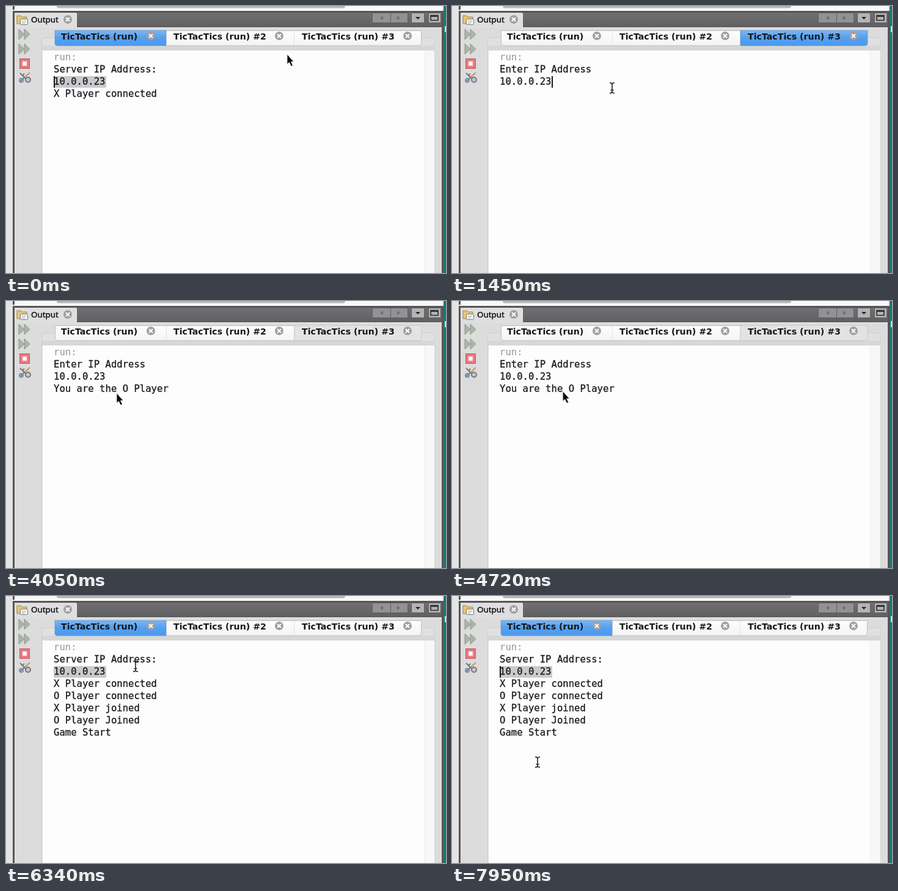
Recreate the animation shown at these times as an HTML page. Size 720 by 438 pixels, loop 7990 ms.

```html
<!DOCTYPE html>
<html lang="en">
<head>
<meta charset="utf-8">
<title>Output console</title>
<style>
  html, body { margin: 0; width: 100%; height: 100%; overflow: hidden; background: #e0e0e0; }
  svg { display: block; width: 720px; height: 438px; }
  text { white-space: pre; }
  .mono { font: 15.6px "DejaVu Sans Mono", monospace; fill: #1a1a1a; }
  .mono text { stroke: #1a1a1a; stroke-width: .3; }
  .muted { fill: #949494; }
  .tab { font: bold 14.2px "DejaVu Sans", sans-serif; fill: #161616; }
  .title { font: 13.4px "Noto Sans", sans-serif; fill: #111; stroke: #111; stroke-width: .4; }

  .timed { animation: 7990ms step-end infinite; }
  .server { animation-name: server; }
  .client { animation-name: client; }
  .focused { animation-name: focused; }
  .unfocused { animation-name: unfocused; }
  .pasted { animation-name: pasted; }
  .assigned { animation-name: assigned; }
  .started { animation-name: started; }
  .server-caret { animation-name: server-caret; }
  .caret-before { animation-name: caret-before; }
  .caret-after { animation-name: caret-after; }
  .arrow { animation-name: arrow; }
  .beam { animation-name: beam; }
  .press { animation-name: press; }
  .pointer { animation: travel 7990ms ease-in-out infinite; }

  @keyframes server { 0%, 70.71%, 100% { opacity: 1 } 7.01% { opacity: 0 } }
  @keyframes client { 0%, 70.71%, 100% { opacity: 0 } 7.01% { opacity: 1 } }
  @keyframes focused { 0%, 25.03%, 100% { opacity: 0 } 7.01% { opacity: 1 } }
  @keyframes unfocused { 0%, 70.71%, 100% { opacity: 0 } 25.03% { opacity: 1 } }
  @keyframes pasted { 0%, 100% { opacity: 0 } 16.27% { opacity: 1 } }
  @keyframes assigned { 0%, 100% { opacity: 0 } 37.55% { opacity: 1 } }
  @keyframes started { 0%, 100% { opacity: 0 } 70.71% { opacity: 1 } }
  @keyframes server-caret {
    0%, 70.71%, 83.23%, 95.74%, 100% { opacity: 1 }
    7.01%, 76.97%, 89.49% { opacity: 0 }
  }
  @keyframes caret-before { 0%, 13.27%, 100% { opacity: 0 } 7.01% { opacity: 1 } }
  @keyframes caret-after { 0%, 22.53%, 100% { opacity: 0 } 16.27% { opacity: 1 } }
  @keyframes arrow { 0%, 25.03%, 100% { opacity: 1 } 10.6%, 74% { opacity: 0 } }
  @keyframes beam { 0%, 25.03%, 100% { opacity: 0 } 10.6%, 74% { opacity: 1 } }
  @keyframes press { 0%, 7.5%, 70.71%, 100% { opacity: 0 } 5.5%, 67.8% { opacity: 1 } }
  @keyframes travel {
    0% { transform: translate(460px, 80px) }
    5%, 8% { transform: translate(560px, 53px) }
    15.5%, 33% { transform: translate(262px, 134px) }
    42%, 58% { transform: translate(181px, 152px) }
    66.5%, 71.5% { transform: translate(187px, 54px) }
    78.5%, 81% { transform: translate(212px, 115px) }
    92%, 100% { transform: translate(140px, 272px) }
  }
</style>
</head>
<body>
<svg viewBox="0 0 720 438">
  <defs>
    <linearGradient id="blue" x2="0" y2="1">
      <stop stop-color="#7db5f3"/><stop offset=".5" stop-color="#559fee"/><stop offset="1" stop-color="#4b9bf0"/>
    </linearGradient>
    <linearGradient id="bar" x2="0" y2="1">
      <stop stop-color="#707072"/><stop offset="1" stop-color="#5f5f61"/>
    </linearGradient>
    <linearGradient id="pale" x2="0" y2="1">
      <stop stop-color="#fdfdfd"/><stop offset="1" stop-color="#f4f4f4"/>
    </linearGradient>
    <g id="close">
      <circle r="7" fill="#a0a0a0"/>
      <path d="M-3-3 3 3M3-3-3 3" stroke="#fff" stroke-width="2"/>
    </g>
    <path id="forward" d="M0 0 9 8.5 0 17zM9 0 18 8.5 9 17z" fill="#acb5aa" stroke="#8b9688"/>
  </defs>

  <!-- window frame -->
  <rect width="720" height="438" fill="#e4e4e4"/>
  <rect x="14" width="700" height="8" fill="#f8f8f8"/>
  <rect x="83" y="-4" width="472" height="7.5" rx="3.5" fill="#b6b6b8"/>
  <path d="M12.5 0V6" stroke="#555" stroke-width="3"/>
  <rect x="11" y="8" width="705" height="430" fill="#555557"/>
  <rect x="14" y="11" width="699" height="427" fill="#dcdcdc"/>
  <rect x="716" width="4" height="438" fill="#1b7874"/>
  <rect x="718" y="33" width="2" height="10" fill="#d5e3e1"/>

  <!-- title bar -->
  <rect x="115" y="11" width="598" height="24" fill="url(#bar)"/>
  <rect x="14" y="12" width="101" height="24" fill="#dfdfe1"/>
  <path d="M115.5 12V35.5H713" fill="none" stroke="#f0f0f0"/>
  <path d="M18 16h6l2 2h8v11H18z" fill="#e8c56c" stroke="#a08446"/>
  <rect x="23.5" y="21.5" width="12" height="9" rx="1" fill="#fafafa" stroke="#777"/>
  <path d="M26 25h7M26 28h5" stroke="#8b99a8"/>
  <text class="title" x="41" y="27">Output</text>
  <use href="#close" x="101" y="22"/>
  <g stroke="#606062">
    <path d="M599.5 11.5h58v16h-58zM629.5 11.5v16" fill="#929294"/>
    <path d="M663.5 11.5h21v16h-21zM691.5 11.5h20v16h-20z" fill="#b4b4b6"/>
  </g>
  <path d="M617 16 612 19.5 617 23zM640 16 645 19.5 640 23z" fill="#6d6d6f"/>
  <path d="M670 18h8l-4 4z" fill="#222"/>
  <path d="M695 15.5h12v8H695zM695 17h12" fill="none" stroke="#2b2b2b" stroke-width="1.6"/>

  <!-- side tools -->
  <use href="#forward" x="21" y="38"/>
  <use href="#forward" x="21" y="62"/>
  <rect x="22.5" y="86.5" width="16" height="16" fill="#e8787c" stroke="#c4585c"/>
  <rect x="27" y="91" width="7" height="7" fill="#fff" stroke="#f5b5b5"/>
  <g fill="none" stroke="#77777b" stroke-width="2">
    <path d="M23 110l4 4 3-3M27 114l11 11M38 110l-15 14"/>
    <circle cx="25" cy="122" r="3" stroke="#7290b5"/>
    <circle cx="36" cy="121" r="4" fill="#c8c8ca"/>
  </g>
  <path d="M31 117 39 109" stroke="#cba264" stroke-width="2"/>

  <!-- console panel -->
  <path d="M58.5 438V56q0-4 4-4H697q4 0 4 4V438" fill="#e0e0e0" stroke="#cecece"/>
  <rect x="59" y="65" width="642" height="8" fill="#d7d7d7"/>
  <rect x="60" y="73" width="641" height="365" fill="#fdfdfd"/>
  <rect x="684" y="73" width="17" height="365" fill="#f7f7f7"/>
  <path d="M684.5 73V438" stroke="#efefef"/>

  <!-- tabs -->
  <path d="M80.5 40.5h599V61q0 4-4 4H84.5q-4 0-4-4z" fill="url(#pale)" stroke="#bebebe"/>
  <path d="M262.5 41V64M471.5 41V64" stroke="#e2e2e2"/>
  <path class="timed server" d="M80 40H262V65H84q-4 0-4-4z" fill="url(#blue)" stroke="#5a8dc4" stroke-width=".6"/>
  <g stroke-width=".6">
    <path class="timed focused" d="M472 40H680V61q0 4-4 4H472z" fill="url(#blue)" stroke="#5a8dc4"/>
    <path class="timed unfocused" d="M472 40H680V61q0 4-4 4H472z" fill="#e3e3e3" stroke="#bebebe"/>
  </g>
  <g class="tab">
    <text x="90" y="55">TicTacTics (run)</text>
    <text x="274" y="55">TicTacTics (run) #2</text>
    <text x="484" y="55">TicTacTics (run) #3</text>
  </g>
  <use href="#close" x="237" y="49"/>
  <use href="#close" x="447" y="49"/>
  <use href="#close" x="657" y="49"/>

  <!-- console text -->
  <text class="mono muted" x="78" y="89">run:</text>
  <g class="mono timed server">
    <rect x="78" y="115" width="86" height="19" fill="#c9c9ce"/>
    <text x="78" y="109">Server IP Address:</text>
    <text x="78" y="129">10.0.0.23</text>
    <text x="78" y="149">X Player connected</text>
    <g class="timed started">
      <text x="78" y="169">O Player connected</text>
      <text x="78" y="189">X Player joined</text>
      <text x="78" y="209">O Player Joined</text>
      <text x="78" y="229">Game Start</text>
    </g>
    <rect class="timed server-caret" x="78" y="115" width="2" height="19"/>
  </g>
  <g class="mono timed client">
    <text x="78" y="109">Enter IP Address</text>
    <text class="timed pasted" x="78" y="129">10.0.0.23</text>
    <text class="timed assigned" x="78" y="149">You are the O Player</text>
    <rect class="timed caret-before" x="78" y="115" width="2" height="19"/>
    <rect class="timed caret-after" x="163" y="115" width="2" height="19"/>
  </g>

  <!-- pointer -->
  <g class="pointer">
    <circle class="timed press" cx="1" cy="2" r="23.5" fill="none" stroke="#111" stroke-width="3"/>
    <path class="timed arrow" d="M0-1V15.5L3.5 12.5 6.5 19 9.5 17.5 6.500 11.500H11z" fill="#0a0a0a" stroke="#fff" stroke-width=".8"/>
    <path class="timed beam" d="M-4-8Q0-8 0-5Q0-8 4-8M0-6V8M-4 9Q0 9 0 6Q0 9 4 9M-2.5 4h5" fill="none" stroke="#222" stroke-width="1.6"/>
  </g>
</svg>
</body>
</html>
```
